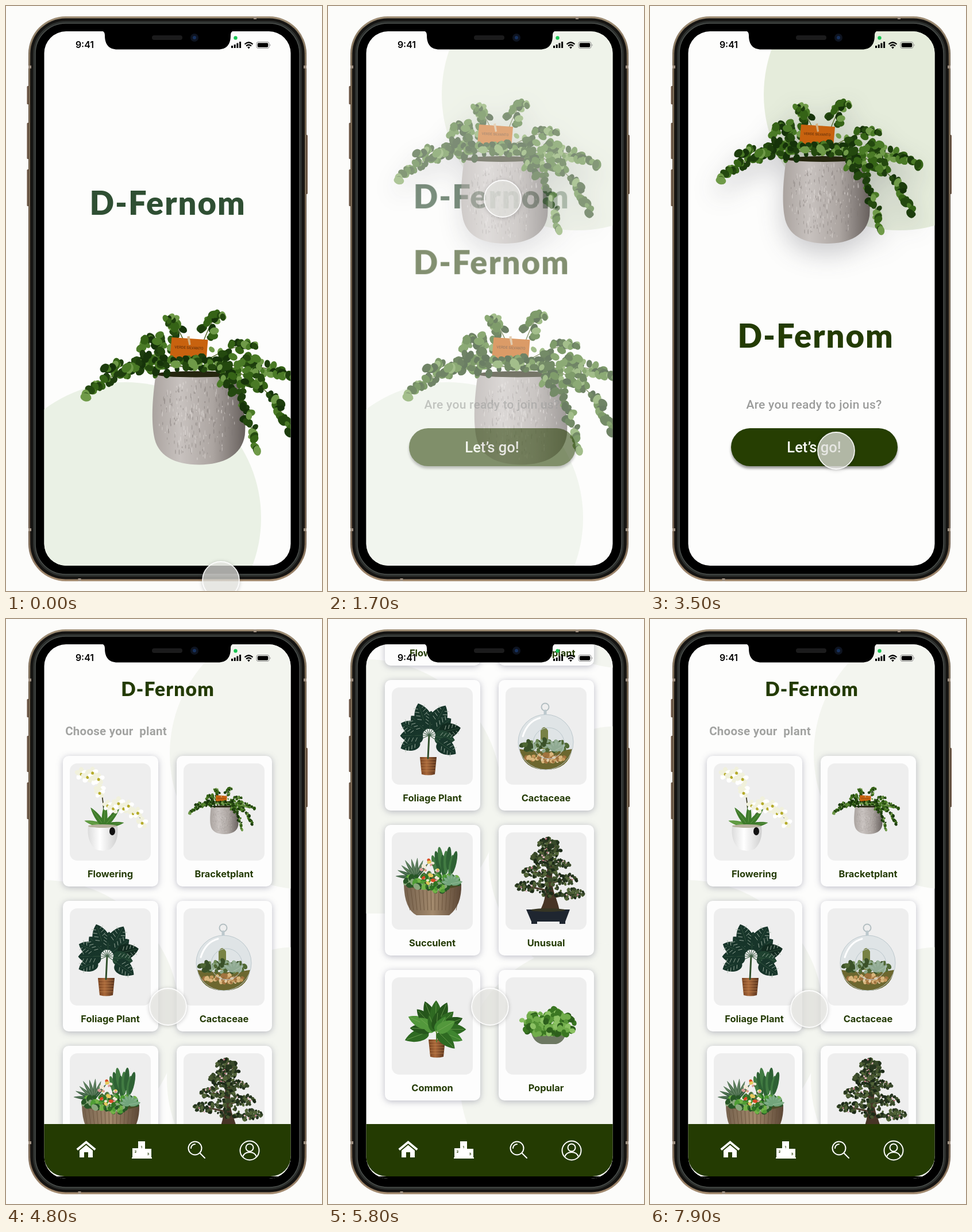
These frames come from a looping animation (550x1017 px, 8000 ms). An HTML page:

```html
<!DOCTYPE html>
<html lang="en">
<head>
<meta charset="utf-8">
<title>Plant shop app</title>
<style>
html, body { margin: 0; width: 100%; height: 100%; overflow: hidden; background: #fcfcfa; }
svg { display: block; width: 100vw; height: 100vh; }
text { font-family: Roboto, sans-serif; text-anchor: middle; }
.brand { font: 900 56px Lato, sans-serif; letter-spacing: .035em; fill: #233b03; transform-box: fill-box; transform-origin: center; }
.label { font: 700 16.4px Inter, sans-serif; fill: #243b05; }
.soft { filter: drop-shadow(0 18px 22px rgba(40, 40, 60, .24)); }
.card { fill: #fdfdfd; filter: drop-shadow(0 2px 6px rgba(40, 40, 80, .3)); }
.pill { fill: #263e02; filter: drop-shadow(0 4px 2px rgba(0, 0, 0, .4)); }
.line { fill: none; stroke: #fff; stroke-width: 2; stroke-linecap: round; }
.move { animation: 8s ease-in-out infinite both; }
#splash { animation-name: splash; }
#intro { animation-name: intro; }
#shop { animation-name: shop; }
#t1 { animation-name: t1; }
#t2 { animation-name: t2; }
#t3 { animation-name: t3; }
#page { animation-name: scroll; }
#touch { animation-name: touch; filter: drop-shadow(0 1px 3px rgba(0, 0, 0, .25)); }
@keyframes splash { 0%, 16.9% { opacity: 1 } 27.2%, 100% { opacity: 0 } }
@keyframes intro { 0%, 15.6% { opacity: 0 } 26.2%, 46.2% { opacity: 1 } 55%, 100% { opacity: 0 } }
@keyframes shop { 0%, 46.2% { opacity: 0 } 55%, 100% { opacity: 1 } }
@keyframes t1 { 0%, 16.9% { transform: none } 26.2%, 100% { transform: translate(7px, -25px) } }
@keyframes t2 {
  0%, 16.9% { transform: translate(-7px, -231px) }
  26.2%, 46.2% { transform: none }
  55%, 100% { transform: translate(-6.5px, -451px) scale(.6) }
}
@keyframes t3 { 0%, 46.2% { transform: translate(6.5px, 451px) scale(1.66) } 55%, 100% { transform: none } }
@keyframes scroll {
  0%, 62.5% { transform: none }
  70% { transform: translateY(-390px) }
  72.5% { transform: translateY(-384px) }
  77.5%, 87.5% { transform: translateY(-378px) }
  96.2%, 100% { transform: none }
}
@keyframes touch {
  0% { transform: translate(374px, 998px) }
  13% { transform: translate(515px, 980px) }
  21%, 28% { transform: translate(304px, 335px) }
  40%, 47% { transform: translate(324px, 773px) }
  55%, 88% { transform: translate(282px, 674px) }
  97%, 100% { transform: translate(277px, 678px) }
}
</style>
</head>
<body>
<svg viewBox="0 0 550 1017" preserveAspectRatio="none">
  <defs>
    <clipPath id="screen"><rect x="66.500" y="44" width="429" height="929" rx="38"/></clipPath>
    <clipPath id="half"><path d="M66 400H400V896H66Z"/></clipPath>
    <linearGradient id="gold" x2="0" y2="1">
      <stop stop-color="#9a8a72"/><stop offset=".1" stop-color="#4d4030"/><stop offset=".9" stop-color="#44352a"/>
      <stop offset="1" stop-color="#a08468"/>
    </linearGradient>
    <linearGradient id="stone">
      <stop stop-color="#aaa39f"/><stop offset=".3" stop-color="#c8c2bf"/><stop offset=".65" stop-color="#aca5a1"/>
      <stop offset="1" stop-color="#67605d"/>
    </linearGradient>
    <linearGradient id="wicker"><stop stop-color="#74401f"/><stop offset=".4" stop-color="#a9683a"/><stop offset="1" stop-color="#54301a"/></linearGradient>
    <linearGradient id="bowl"><stop stop-color="#75614d"/><stop offset=".5" stop-color="#a38a6d"/><stop offset="1" stop-color="#5b4635"/></linearGradient>
    <linearGradient id="china"><stop stop-color="#dcdcdc"/><stop offset=".4" stop-color="#fff"/><stop offset="1" stop-color="#cfcfcf"/></linearGradient>
    <g id="plants"></g>
  </defs>

  <g fill="#6b5544">
    <rect x="36.500" y="139" width="5" height="32" rx="1.500"/><rect x="36.500" y="203" width="5" height="63" rx="1.500"/>
    <rect x="36.500" y="284" width="5" height="64" rx="1.500"/><rect x="520" y="224" width="5" height="103" rx="1.500"/>
  </g>
  <rect x="39" y="18" width="484" height="982" rx="65" fill="url(#gold)"/>
  <rect x="40.500" y="19.500" width="481" height="979" rx="63" fill="none" stroke="#a9967c"/>
  <rect x="42.500" y="21.500" width="477" height="975" rx="61" fill="#151412"/>
  <rect x="47" y="26" width="468" height="966" rx="57" fill="#2c2f2d"/>
  <rect x="51" y="30" width="460" height="958" rx="53" stroke="#4b4f4c" stroke-width="1.500"/>
  <path d="M39 106h5M518 106h5M39 910.500h5M518 910.500h5M433.500 18v5M128 995v5" stroke="#a19283" stroke-width="5"/>

  <g clip-path="url(#screen)">
    <path fill="#fdfdfc" d="M66 44H496V974H66Z"/>
    <g id="splash" class="move">
      <circle cx="208" cy="890" r="236" fill="#eaf1e5"/>
      <use href="#vine" transform="translate(7 355.500) scale(1.07)"/>
      <text id="t1" class="brand move" x="281.500" y="363" style="fill:#2f4f33">D-Fernom</text>
    </g>
    <g id="intro" class="move">
      <circle cx="434" cy="154" r="236" fill="#e5ecdb"/>
      <use href="#vine" class="soft"/>
      <text x="285.500" y="700" font-size="21" font-weight="500" letter-spacing=".25" fill="#9b9c9b">Are you ready to join us?</text>
      <rect class="pill" x="141" y="734" width="290" height="66" rx="33"/>
      <text x="285.500" y="776" font-size="25.500" font-weight="500" fill="#f8f9f4">Let’s go!</text>
      <text id="t2" class="brand move" x="288.500" y="594">D-Fernom</text>
    </g>
    <g id="shop" class="move">
      <g id="page" class="move">
        <g fill="#f3f5ef">
          <circle cx="521" cy="234" r="236"/><circle cx="66" cy="690" r="236" clip-path="url(#half)"/>
          <circle cx="510" cy="800" r="230"/><circle cx="465" cy="1184" r="236"/>
        </g>
        <text id="t3" class="brand move" x="281.500" y="134" style="font-size:33.500px">D-Fernom</text>
        <text x="191.500" y="202" font-size="20.500" font-weight="700" letter-spacing=".25" fill="#a2a3a1">Choose your&nbsp; plant</text>
        <g id="cards"></g>
      </g>
      <path fill="#243b02" d="M66 878H496V933a36 36 0 0 1-36 36H102a36 36 0 0 1-36-36Z"/>
      <path stroke="#000" stroke-width="6" d="M66 972H496"/>
      <g fill="#fff">
        <path d="M139.500 907l17 14-2.500 3-14.500-12-14.500 12-2.500-3ZM128 924l11.500-9.500 11.500 9.500v12h-8v-9h-7v9h-8Z"/>
        <path d="M219 938v-2h1v-16h10v-12h12v13h11v15h1v2Z"/>
      </g>
      <g font-size="6" font-weight="700" fill="#243b02">
        <text x="225.500" y="928">2</text><text x="236" y="920">1</text><text x="247.500" y="932">3</text>
      </g>
      <g class="line">
        <circle cx="329" cy="920" r="11.500"/><path d="M337.500 928.500L346 937M322 920a7 7 0 0 1 7-7"/>
        <circle cx="424" cy="924" r="16.500"/><circle cx="424" cy="919" r="6.500"/>
        <path d="M412 935c2-6 6-8 12-8s10 2 12 8"/>
      </g>
    </g>
  </g>

  <path d="M164 43c6 0 8 3 8 8 0 16 7 24.500 22 24.500H369c15 0 22-8.500 22-24.500 0-5 2-8 8-8Z"/>
  <rect x="254" y="51" width="53" height="8" rx="4" fill="#1b1b1c"/>
  <circle cx="328" cy="55" r="7" fill="#0e1420"/><circle cx="328" cy="55" r="3" fill="#16305c"/>
  <circle cx="399.500" cy="55.500" r="3.200" fill="#18c552"/>
  <text x="137" y="73" style="font:600 16px Inter,sans-serif">9:41</text>
  <path d="M392 69h3v4h-3ZM396.700 67h3v6h-3ZM401.400 64.500h3v8.500h-3ZM406.100 62h3v11h-3Z"/>
  <g fill="none" stroke="#000" stroke-width="2.200">
    <path d="M415.500 66.500q7-6.500 14 0M418 69.500q4.500-4 9 0"/><path d="M422.500 73.500l-1.500-1.800q1.500-1 3 0Z" stroke-width="1.200"/>
  </g>
  <rect x="436" y="62.500" width="22" height="11" rx="3" fill="none" stroke="#8a8a8a"/>
  <rect x="437.800" y="64.300" width="18.400" height="7.400" rx="1.600"/><path d="M459.500 66v4q2-2 0-4" fill="#8a8a8a"/>

  <g id="touch" class="move"><circle r="32" fill="#efefeb" fill-opacity=".7" stroke="#fff" stroke-width="1.800" stroke-opacity=".9"/></g>
</svg>
<script>
let seed = 11;
const rnd = (a = 0, b = 1) => {
  seed = seed * 16807 % 2147483647;
  return a + (b - a) * seed / 2147483647;
};
const pick = list => list[Math.floor(rnd(0, list.length))];
const f = n => n.toFixed(1);
const mix = (a, b, t) => a + (b - a) * t;
const many = (n, make) => Array.from({ length: n }, (_, i) => make(i, i / Math.max(1, n - 1))).join('');
const path = (d, fill) => `<path d="${d}" fill="${fill}"/>`;
const stem = (d, color, w = 1) => `<path d="${d}" fill="none" stroke="${color}" stroke-width="${w}" stroke-linecap="round"/>`;
const oval = (x, y, rx, ry, fill, turn = 0) =>
  `<ellipse rx="${f(rx)}" ry="${f(ry)}" fill="${fill}" transform="translate(${f(x)} ${f(y)}) rotate(${f(turn)})"/>`;

// Quadratic curve: point at t.
const bend = (a, b, c, t) => [0, 1].map(k => mix(mix(a[k], b[k], t), mix(b[k], c[k], t), t));

// Random leaves inside an ellipse.
const clump = (x, y, rx, ry, n, size, colors, flat = .75) => many(n, () => {
  const a = rnd(0, 2 * Math.PI), r = Math.sqrt(rnd()), k = size * rnd(.65, 1.2);
  return oval(x + rx * r * Math.cos(a), y + ry * r * Math.sin(a), k, k * flat, pick(colors), rnd(0, 180));
});

// Pointed leaves spread around x, y; each starts "reach" away on its own stalk.
const fan = (x, y, n, from, to, reach, len, wide, colors, vein, slits = 0) => many(n, (i, t) => {
  const l = len * rnd(.85, 1.1), w = l * wide, s = reach * (i % 2 ? .55 : 1);
  return `<g transform="translate(${x} ${y}) rotate(${f(mix(from, to, t))}) translate(${f(s)})">` + stem(`M${f(-s)} 0H0`, vein) +
    path(`M0 0C${f(-l * .1)} ${f(-w * 1.2)} ${f(l * .6)} ${f(-w * 1.3)} ${f(l)} 0C${f(l * .6)} ${f(w * 1.3)} ${f(-l * .1)} ${f(w * 1.2)} 0 0`, pick(colors)) +
    stem(`M0 0H${f(l * .9)}`, vein, .6) + many(slits, k => {
      const p = f(l * (.25 + k * .17));
      return stem(`M${p} ${f(-w * .25)}l3 ${f(-w * .4)}M${p} ${f(w * .25)}l3 ${f(w * .4)}`, '#a9b8a9', .8);
    }) + '</g>';
});

const vine = () => {
  const greens = ['#16330a', '#24490f', '#356316', '#4a7a26', '#6f9a48', '#1d3d0d'];
  const root = [300, 255];
  const tips = [[121, 302], [155, 258], [215, 212], [255, 180], [343, 172], [400, 222], [470, 276], [458, 362], [402, 392]];
  const sprays = tips.map(tip => {
    const knee = [mix(root[0], tip[0], .7), Math.min(root[1], tip[1]) - 12];
    const size = Math.hypot(tip[0] - root[0], tip[1] - root[1]);
    return stem(`M${root}Q${knee} ${tip}`, '#56692f', 1.4) + many(Math.round(size / 4.6), (i, t) => {
      const [x, y] = bend(root, knee, tip, mix(.25, 1, t)), gap = mix(17, 4, t);
      return clump(x, y, gap, gap, 1, 7.6, greens);
    });
  }).join('');
  const grain = many(260, () => {
    const a = rnd(0, 2 * Math.PI), r = Math.sqrt(rnd());
    return oval(305 + 64 * r * Math.cos(a), 338 + 66 * r * Math.sin(a), rnd(.4, 1), rnd(1, 5), pick(['#e8e3e0', '#7d7673']));
  });
  return path('M237 267C231 310 230 340 234 365C239 399 268 413 308 413C347 413 377 398 382 365C386 330 372 292 368 267Z', 'url(#stone)') +
    `<g opacity=".45">${grain}</g>` + oval(302, 266, 65, 5, '#25260f') +
    sprays + clump(242, 225, 30, 24, 18, 7.6, greens) + clump(388, 262, 30, 24, 26, 7.6, greens) +
    path('M263 206L322 210L319 246L260 240Z', '#c8620f') +
    '<text x="291" y="225" transform="rotate(3 291 225)" font-size="6" fill="#54290a">VERDE SILVANTO</text>' +
    path('M288 205l4-1 2 14-3 1Z', '#d3b083') + clump(305, 250, 66, 11, 44, 7.6, greens);
};

const bloom = (x, y, r) => many(5, i => {
  const a = i * 1.257 - 1.57;
  return oval(x + r * .6 * Math.cos(a), y + r * .6 * Math.sin(a), r * .6, r * .45, i % 2 ? '#fff' : '#f1f1dc', a * 57.3);
}) + oval(x, y + 1, 2.4, 2.6, '#b5ab2b');

const arch = (a, b, c, n) => many(n, (i, t) => {
  const [x, y] = bend(a, b, c, t);
  return bloom(x, y + (i % 2 ? 6 : -2), rnd(8, 10));
});

const orchid = () =>
  stem('M73 122Q70 60 61 40T35 32M77 122Q86 95 96 86T137 110', '#3b3a22', 1.8) +
  fan(72, 122, 5, -165, -10, 0, 38, .13, ['#3d7a2a', '#5c983f'], '#78ab55') +
  arch([32, 33], [68, 20], [64, 66], 7) + arch([78, 88], [112, 74], [138, 110], 8) +
  path('M44 122H95Q98 148 83 162Q69 168 56 162Q41 148 44 122Z', 'url(#china)') +
  oval(69, 122, 25, 3, '#b9b39f') + oval(86, 131, 5, 7, '#111');

const basket = (x, y) => path(`M${x} ${y}h29l-3 30q-11.500 3 -23 0Z`, 'url(#wicker)') +
  many(5, i => stem(`M${x + 2} ${y + 4 + i * 5}h25`, '#cf9158', .6));

const monstera = () => basket(61, 134) +
  stem('M75 136L77 96', '#31502c', 3) +
  fan(77, 96, 11, -205, 35, 20, 36, .4, ['#17352a', '#1f4230', '#122b20'], '#3f6148', 4);

const globe = () => {
  const pale = '#bcc8cd';
  return '<circle cx="81" cy="47" r="6.500" fill="none" stroke="#b4bfc2" stroke-width="2"/>' + stem('M81 54v8', pale, 5) +
    oval(82, 108, 48, 48, '#dfe4e6') + path('M36 120Q82 128 128 120Q122 156 82 156Q43 156 36 120Z', '#6c672f') +
    clump(82, 136, 36, 7, 44, 4, ['#c89a5d', '#d9b67d', '#a1733f', '#e3cca4']) +
    path('M73 120V88q6-12 13 0V120Z', '#788245') +
    clump(80, 114, 40, 10, 64, 5, ['#4f6834', '#6f8a56', '#3a5128', '#8da889']) +
    fan(100, 122, 5, -150, -30, 0, 20, .25, ['#91ab94'], '#b9cbb8') +
    `<g fill="none" stroke="${pale}"><circle cx="87" cy="110" r="27"/><circle cx="82" cy="108" r="48"/></g>` +
    stem('M42 98Q50 72 72 66', '#fff', 3);
};

const succulent = () => {
  const greens = ['#2f7423', '#4f9d35', '#72b347', '#275626', '#89a77c'];
  return path('M33 103Q82 94 133 103Q134 140 112 157H55Q34 146 33 103Z', 'url(#bowl)') +
    many(14, i => stem(`M${38 + i * 7} 110l${f((7 - i) * .8)} 38`, '#665039', .8)) +
    oval(83, 103, 49, 9, '#4b4d26') +
    many(8, i => oval(88 + i * 4.6, 72 - (i % 3) * 7, 4.5, 20, i % 2 ? '#2e6134' : '#417b42', (i - 4) * 4)) +
    fan(54, 92, 8, -175, -50, 0, 34, .09, ['#4c6e4e', '#365a3d'], '#8daa87') +
    clump(82, 98, 48, 12, 100, 5.5, greens) + clump(94, 112, 18, 6, 24, 4, greens) +
    clump(78, 82, 18, 22, 30, 3.4, ['#f2e9d6', '#d99a98', '#d94d25', '#e6c85c', '#4b7138']) +
    fan(116, 102, 7, -170, -10, 0, 18, .25, ['#73a57c'], '#a5c7a4');
};

const bonsai = () => {
  const tiers = many(8, i => {
    const y = 32 + i * 12.5, x = 86 + (i % 2 ? 1 : -1) * i * 5.6, shade = ['#26351f', '#38492a', '#1c2a18', '#526438', '#45552f'];
    return stem(`M88 ${y + 8}L${f(x)} ${y}`, '#4a3829', 3) + clump(x, y, 17 + i, 9, 50, 3.4, shade) +
      clump(86, y, 20, 5, 14, 3.4, shade) + clump(x, y, 18, 9, 3, 1.9, ['#c4798b', '#e2b6bd']);
  });
  return path('M70 152Q80 136 81 120T85 70L91 34L95 72Q90 100 98 122T106 152Z', '#473426') + tiers +
    path('M48 147H124L116 168H57ZM57 168h10v4h-10ZM106 168h10v4h-10Z', '#1f2630') + oval(86, 148, 30, 3, '#363524');
};

const shrub = () => {
  const greens = ['#2f6a22', '#3f8530', '#25561b', '#53983c'];
  return basket(76, 121) + stem('M90 125V95', '#557f33', 2) +
    fan(88, 103, 12, -200, 45, 14, 42, .27, greens, '#7fb05c') + fan(89, 108, 5, -140, -30, 4, 32, .3, greens, '#7fb05c');
};

const pilea = () => {
  const greens = ['#3a7622', '#569436', '#71ad4b', '#8bc163', '#2d5f1c'];
  return path('M56 106H118Q115 126 100 129H75Q60 126 56 106Z', '#6d7862') +
    clump(86, 90, 46, 22, 120, 6.2, greens, .82) + clump(86, 104, 46, 9, 40, 6.2, greens, .82);
};

const kinds = { vine, orchid, monstera, globe, succulent, bonsai, shrub, pilea };
document.getElementById('plants').innerHTML =
  Object.entries(kinds).map(([id, draw]) => `<g id="${id}">${draw()}</g>`).join('');

const items = [['Flowering', 'orchid'], ['Bracketplant', 'vine'], ['Foliage Plant', 'monstera'], ['Cactaceae', 'globe'],
  ['Succulent', 'succulent'], ['Unusual', 'bonsai'], ['Common', 'shrub'], ['Popular', 'pilea']];
document.getElementById('cards').innerHTML = items.map(([name, id], i) => {
  const fit = id === 'vine' ? 'transform="translate(-17.500 1) scale(.327)"' : '';
  return `<g transform="translate(${99 + i % 2 * 198} ${238 + (i >> 1) * 252})">
    <rect class="card" width="166" height="227" rx="10"/>
    <rect x="12" y="13" width="141" height="169" rx="13" fill="#eee"/>
    <use href="#${id}" ${fit}/><text class="label" x="82.500" y="211">${name}</text></g>`;
}).join('');
</script>
</body>
</html>
```
